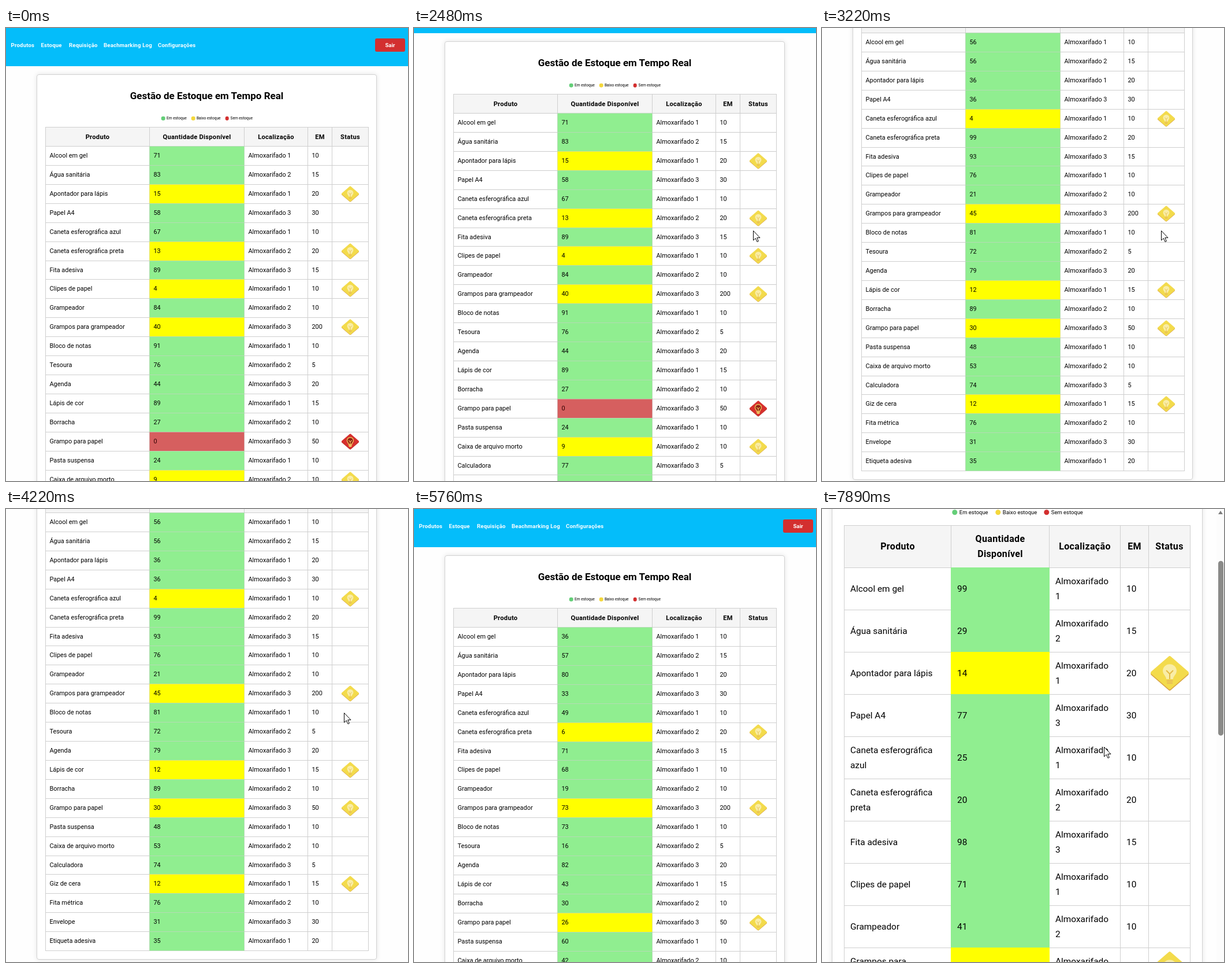
Animation, 696 px wide and 783 px high, one loop 8000 ms. Source, as an HTML page:

```html
<!DOCTYPE html>
<html lang="pt-BR">
<head>
<meta charset="utf-8">
<title>Gestão de Estoque</title>
<style>
@property --s { syntax: "<number>"; inherits: true; initial-value: 0; }
html, body { margin: 0; width: 100%; height: 100%; overflow: hidden; background: #fefefe; }
#stage { position: relative; width: 696px; height: 783px; overflow: hidden; font-family: Roboto, sans-serif; color: #000; }
#stage div, #stage svg { position: absolute; box-sizing: border-box; }
#stage .page { inset: 0; overflow: hidden; background: #fefefe; }
.roll { left: 0; top: 0; width: 696px; transform: translateY(calc(var(--s) * -1px)); }
.set { left: 0; top: 0; }

.bar { left: 0; top: 0; }
.mid { white-space: nowrap; transform: translate(-50%, -50%); }
.left { white-space: nowrap; transform: translateY(-50%); }
.card { background: #fff; border: 1px solid #d2d2d2; box-shadow: 0 0 8px rgba(0, 0, 0, .11); }
.title, .th, .nav, .exit { font-weight: 700; }
.nav, .exit { color: #fff; }
.exit { background: #d32f2f; display: flex; align-items: center; justify-content: center; }
.dot { border-radius: 50%; transform: translate(-50%, -50%); }
.th, .td { border: 1px solid #cfcfcf; display: flex; align-items: center; }
.th { background: #f5f5f5; justify-content: center; text-align: center; letter-spacing: .022em; }
.ok { background: #90ee90; }
.low { background: #ff0; }
.out { background: #d65f5f; color: #300; }

.wide { font-size: 10.9px; }
.wide .bar { width: 696px; height: 66px; background: #04bdfa; }
.wide .nav { font-size: 9.6px; letter-spacing: .02em; }
.wide .exit { left: 639px; top: 18px; width: 52px; height: 23px; border-radius: 3px; font-size: 9.6px; }
.wide .card { left: 53px; top: 80px; width: 589px; height: 897px; border-radius: 4px; }
.wide .title { font-size: 17px; }
.wide .label { font-size: 6.6px; }
.wide .dot { width: 6.6px; height: 6.6px; }
.wide .th { font-size: 11.2px; }
.wide .td { padding: 0 0 1px 6.5px; }
.wide .set .td { border-color: rgba(207, 207, 207, .6); }

.slim { font-size: 15.4px; line-height: 26px; }
.slim .bar { width: 683px; height: 74px; background: #18c5ff; }
.slim .exit { left: 595px; top: 17px; width: 73px; height: 32px; border-radius: 4px; font-size: 13.8px; }
.slim .card { left: 17px; top: 94px; width: 642px; height: 1900px; border-radius: 5px; }
.slim .title { font-size: 24.3px; }
.slim .label { font-size: 9.45px; }
.slim .dot { width: 9.4px; height: 9.4px; }
.slim .th { font-size: 16px; }
.slim .td { padding: 0 10px; }
.slim .set .td { border-color: transparent; }
.line { left: 28px; width: 32px; height: 2.5px; background: #fff; }
.track { left: 683px; top: 0; width: 13px; height: 783px; background: #fcfcfc; }
.thumb { left: 3px; top: 15.4px; width: 9px; height: 302px; border-radius: 5px; background: #8a8a88; transform: translateY(calc(var(--s) * .381px)); }
.up { left: 3px; top: 3px; border: solid transparent; border-width: 0 4.5px 6px; border-bottom-color: #7d7d7d; }

/* one loop is 8 s, so 1% is 80 ms */
.wide { animation: scrollWide 8s linear infinite; }
.slim { animation: scrollSlim 8s linear infinite, showSlim 8s step-end infinite; }
.set0 { animation: set0 8s step-end infinite; }
.set1 { animation: set1 8s step-end infinite; }
.set2 { animation: set2 8s step-end infinite; }
#stage #arrow { left: 0; top: 0; animation: arrow 8s linear infinite; }

@keyframes scrollWide {
  0%, 30.24% { --s: 0; }
  30.25% { --s: 14; animation-timing-function: cubic-bezier(.3, .35, .5, 1); }
  33.48%, 34.24% { --s: 140; }
  34.25%, 37.62% { --s: 142; }
  37.63% { --s: 148; animation-timing-function: cubic-bezier(.3, .35, .5, 1); }
  41.125%, 52.74% { --s: 199; }
  52.75%, 54.37% { --s: 198; }
  54.38% { --s: 182; animation-timing-function: cubic-bezier(.3, .3, .5, 1); }
  59.625%, 100% { --s: 0; }
}
@keyframes scrollSlim {
  0%, 95.11% { --s: 0; }
  95.12%, 96.12% { --s: 20; animation-timing-function: cubic-bezier(.2, .5, .5, 1); }
  98.6%, 100% { --s: 196; }
}
@keyframes showSlim { 0% { opacity: 0; } 83.5%, 100% { opacity: 1; } }
@keyframes set0 { 0% { opacity: 1; } 34.25%, 100% { opacity: 0; } }
@keyframes set1 { 0% { opacity: 0; } 34.25% { opacity: 1; } 72%, 100% { opacity: 0; } }
@keyframes set2 { 0% { opacity: 0; } 72%, 100% { opacity: 1; } }
@keyframes arrow {
  0%, 13.24% { transform: translate(-40px, -40px); }
  13.25% { transform: translate(688px, 765px); animation-timing-function: cubic-bezier(.2, .4, .6, 1); }
  20.85%, 21.625% { transform: translate(638px, 433px); }
  22.5% { transform: translate(617px, 386px); animation-timing-function: ease-out; }
  27.625%, 46.99% { transform: translate(587px, 350px); }
  47%, 54.37% { transform: translate(585px, 352px); }
  59.625%, 66.24% { transform: translate(585px, 359px); }
  66.25% { transform: translate(592px, 430px); }
  67.125%, 67.87% { transform: translate(611px, 662px); }
  67.875%, 84.24% { transform: translate(-40px, -40px); }
  84.25% { transform: translate(684px, 765px); animation-timing-function: cubic-bezier(.2, .4, .5, 1); }
  91%, 96.12% { transform: translate(488px, 410px); }
  98.6%, 100% { transform: translate(488px, 411px); }
}
</style>
</head>
<body>
<div id="stage">
  <svg width="0" height="0">
    <symbol id="low" viewBox="0 0 68 62">
      <g stroke-width="6" stroke-linejoin="round">
        <path d="M34 6 64 32 34 58 4 32Z" fill="#d8a443" stroke="#d8a443"/>
        <path d="M34 4 64 30 34 56 4 30Z" fill="#f3db4c" stroke="#f3db4c"/>
      </g>
      <path d="M28 41C28 36 22 33 22 27a12 12 0 0 1 24 0c0 6-6 9-6 14Z" fill="#f9eda6"/>
      <path d="M28 26l6 6 6-6M34 32v9" fill="none" stroke="#e5ba45" stroke-width="2"/>
      <path d="M28.500 44h11M29 48h10" stroke="#eac057" stroke-width="3"/>
    </symbol>
    <symbol id="out" viewBox="0 0 68 62">
      <g stroke-width="6" stroke-linejoin="round">
        <path d="M34 6 64 32 34 58 4 32Z" fill="#b3261f" stroke="#b3261f"/>
        <path d="M34 4 64 30 34 56 4 30Z" fill="#d6302e" stroke="#d6302e"/>
      </g>
      <path d="M28 41C28 36 22 33 22 27a12 12 0 0 1 24 0c0 6-6 9-6 14Z" fill="#8f1f14" stroke="#f0c95a" stroke-width="3"/>
      <path d="M28 26l6 6 6-6M34 32v9" fill="none" stroke="#f0c95a" stroke-width="2.500"/>
      <path d="M28 45h12M29 49h10" stroke="#f3d568" stroke-width="3.500"/>
    </symbol>
  </svg>
  <div class="page wide"><div class="roll"></div></div>
  <div class="page slim">
    <div class="roll"></div>
    <div class="track"><div class="up"></div><div class="thumb"></div></div>
  </div>
  <svg id="arrow" width="14" height="21" viewBox="-.5 -.5 14 21">
    <path d="M0 0V16.500L3.800 13 6.500 19 8.900 18 6.300 12.100H11.500Z" fill="#fff" stroke="#000"/>
  </svg>
</div>
<script>
const names = ["Alcool em gel", "Água sanitária", "Apontador para lápis", "Papel A4",
  "Caneta esferográfica azul", "Caneta esferográfica preta", "Fita adesiva", "Clipes de papel",
  "Grampeador", "Grampos para grampeador", "Bloco de notas", "Tesoura", "Agenda", "Lápis de cor",
  "Borracha", "Grampo para papel", "Pasta suspensa", "Caixa de arquivo morto", "Calculadora",
  "Giz de cera", "Fita métrica", "Envelope", "Etiqueta adesiva"];
const heads = ["Produto", "Quantidade Disponível", "Localização", "EM", "Status"];
const nums = text => text.split(" ").map(Number);
const minimum = nums("10 15 20 30 10 20 15 10 10 200 10 5 20 15 10 50 10 10 5 15 10 30 20");
const place = i => [1, 2, 1][i] || (i + 2) % 3 + 1;

const wide = {
  root: document.querySelector(".wide .roll"),
  cols: [68, 248, 412, 522, 564, 627], head: 171, top: 204, pitch: 32.92, rows: 23, icon: [31, 28.3],
  title: [347.5, 117], legend: 156, dots: [272, 324, 382.5], gap: 6,
  sets: [
    nums("71 83 15 58 67 13 89 4 84 40 91 76 44 89 27 0 24 9 77 61 94 68 52"),
    nums("56 56 36 36 4 99 93 76 21 45 81 72 79 12 89 30 48 53 74 12 76 31 35"),
    nums("36 57 80 33 49 6 71 68 19 73 73 16 82 43 30 26 60 42")
  ]
};
const slim = {
  root: document.querySelector(".slim .roll"),
  cols: [38, 223, 393, 516, 565, 637], head: 224, top: 297, pitch: 73, rows: 10, icon: [67.5, 61.5],
  title: [337.5, 146.5], legend: 202, dots: [229.5, 304.5, 388.5], gap: 8.3, wrap: true,
  sets: [nums("99 29 14 77 25 20 98 71 41 36")]
};

function add(parent, cls, x, y, text = "", w, h) {
  const el = document.createElement("div");
  el.className = cls;
  if (x !== undefined) el.style.cssText = `left:${x}px;top:${y}px`;
  if (w) el.style.cssText += `;width:${w}px;height:${h}px`;
  el.innerHTML = text;
  parent.append(el);
  return el;
}

function build(v) {
  const { root, cols, icon } = v;
  const rowY = i => Math.round(v.top + v.pitch * i);
  // neighbouring cells share a one pixel border
  const cell = (parent, cls, c, y, end, text) =>
    add(parent, cls, cols[c], y, text, cols[c + 1] - cols[c] + 1, end - y + 1);

  add(root, "bar");
  add(root, "exit", undefined, 0, "Sair");
  add(root, "card");
  add(root, "title mid", ...v.title, "Gestão de Estoque em Tempo Real");
  ["Em", "Baixo", "Sem"].forEach((word, i) => {
    add(root, "dot", v.dots[i], v.legend).style.background = ["#64ce78", "#f4d73c", "#d32f2f"][i];
    add(root, "label left", v.dots[i] + v.gap, v.legend, word + " estoque");
  });
  heads.forEach((text, c) => cell(root, "th", c, v.head, v.top, v.wrap ? text.replace(" ", "<br>") : text));

  for (let i = 0; i < v.rows; i++) {
    const shelf = "Almoxarifado" + (v.wrap ? "<br>" : " ") + place(i);
    [names[i], "", shelf, minimum[i], ""].forEach((text, c) =>
      cell(root, "td", c, rowY(i), rowY(i + 1), text));
  }

  v.sets.forEach((set, k) => {
    const layer = add(root, v.wrap ? "set" : "set set" + k);
    set.forEach((n, i) => {
      const state = n === 0 ? "out" : n < minimum[i] ? "low" : "ok";
      const y = rowY(i), end = rowY(i + 1);
      cell(layer, "td " + state, 1, y, end, n);
      if (state === "ok") return;
      add(layer, "mid", (cols[4] + cols[5] + 1) / 2, (y + end) / 2,
        `<svg width="${icon[0]}" height="${icon[1]}"><use href="#${state}"/></svg>`, ...icon);
    });
  });
}

build(wide);
build(slim);
[["Produtos", 8.5], ["Estoque", 60.5], ["Requisição", 109], ["Beachmarking Log", 169], ["Configurações", 263]]
  .forEach(([text, x]) => add(wide.root, "nav left", x, 29, text));
[35, 43.5, 52].forEach(y => add(slim.root, "line", 28, y));
</script>
</body>
</html>
```
